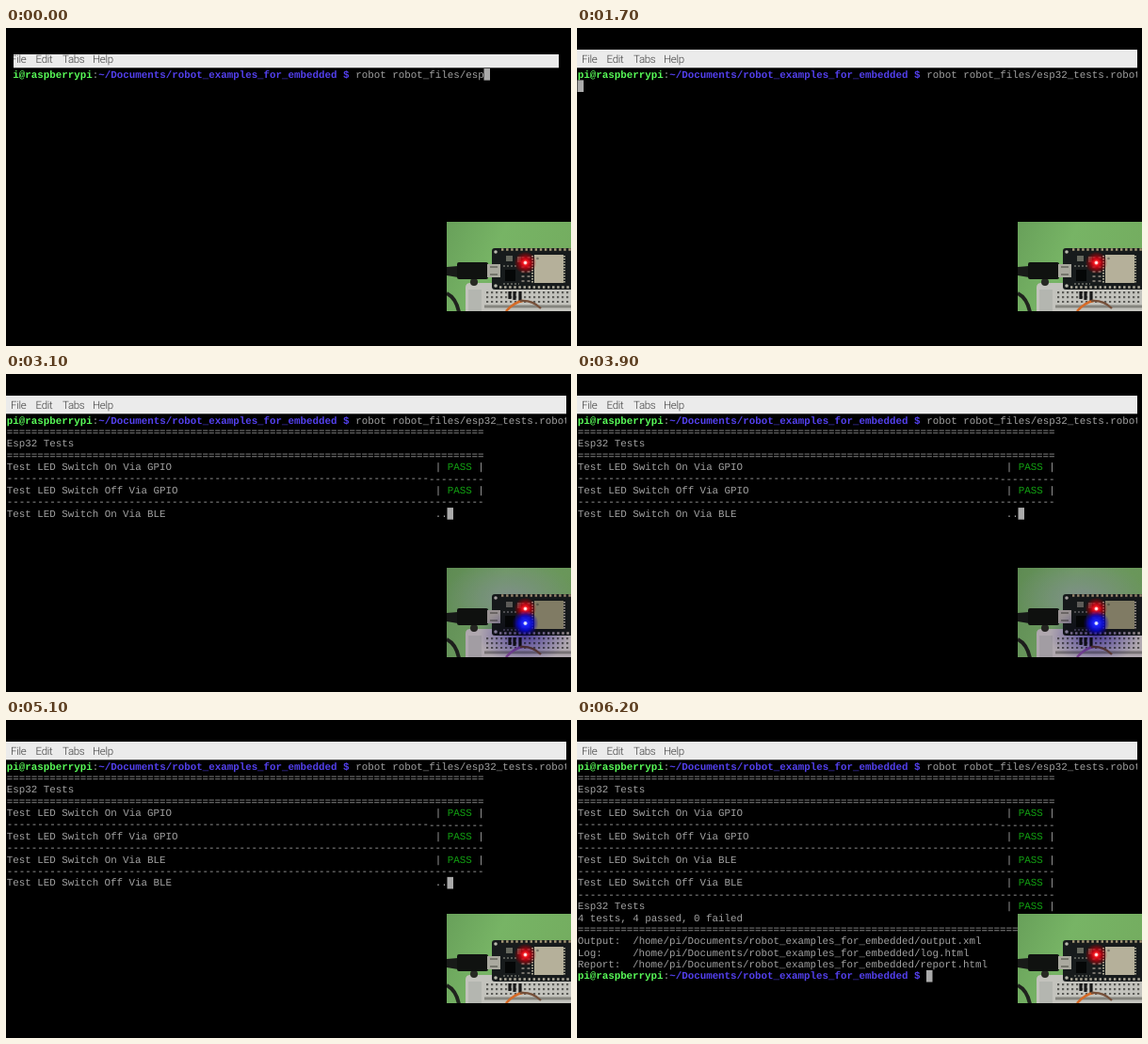
An HTML page that plays this animation: 600x338 px, repeating every 6300 ms.

```html
<!DOCTYPE html>
<html lang="en">
<head>
<meta charset="utf-8">
<title>Robot test run</title>
<style>
html, body { margin: 0; width: 100%; height: 100%; overflow: hidden; background: #000; }
svg { display: block; width: 600px; height: 338px; }
text { white-space: pre; text-rendering: geometricPrecision; }
.term { font: 10.83px "Liberation Mono", monospace; fill: #a2a2a2; }
.menu { font: 300 11.5px Roboto, sans-serif; letter-spacing: -.3px; fill: #3c3c3c; }
.user { font-weight: bold; fill: #58fa58; }
.path { font-weight: bold; fill: #5340ee; }
.pass { fill: #12a212; }
.shade { mix-blend-mode: multiply; }
</style>
</head>
<body>
<svg viewBox="0 0 600 338">
  <defs>
    <clipPath id="wipe"><rect id="pane" height="300"/></clipPath>
    <clipPath id="camClip"><rect x="468" y="206" width="132" height="95"/></clipPath>
    <linearGradient id="desk" x2="1" y2=".3">
      <stop stop-color="#68a05a"/><stop offset=".45" stop-color="#77b465"/><stop offset="1" stop-color="#74ad60"/>
    </linearGradient>
    <radialGradient id="red">
      <stop stop-color="#fff"/><stop offset=".12" stop-color="#ffc0c0"/><stop offset=".2" stop-color="#f81820"/>
      <stop offset=".45" stop-color="#d00010" stop-opacity=".8"/><stop offset="1" stop-color="#a00000" stop-opacity="0"/>
    </radialGradient>
    <radialGradient id="blue">
      <stop stop-color="#fff"/><stop offset=".1" stop-color="#c8d0ff"/><stop offset=".18" stop-color="#2028ff"/>
      <stop offset=".55" stop-color="#0808d8" stop-opacity=".85"/><stop offset="1" stop-color="#1800a0" stop-opacity="0"/>
    </radialGradient>
    <radialGradient id="haze">
      <stop stop-color="#9a9cb4" stop-opacity=".6"/><stop offset="1" stop-color="#9a9cb4" stop-opacity="0"/>
    </radialGradient>
    <radialGradient id="violet">
      <stop stop-color="#7060e0"/><stop offset="1" stop-color="#fff"/>
    </radialGradient>
    <pattern id="holes" x="509" y="279" width="5" height="5" patternUnits="userSpaceOnUse">
      <rect x="1" y="1" width="2.2" height="2.2" fill="#5c5c58"/>
    </pattern>
  </defs>

  <g clip-path="url(#wipe)">
    <rect y="20" width="600" height="22.3" fill="#ebebeb"/>
    <!-- the slight turn frees glyphs from the pixel grid -->
    <g transform="rotate(.01)">
      <g class="menu">
        <text x="5" y="36.8">File</text><text x="31.5" y="36.8">Edit</text>
        <text x="60" y="36.8">Tabs</text><text x="92" y="36.8">Help</text>
      </g>
      <g class="term" id="term"></g>
    </g>
    <rect id="cursor" width="6.5" height="12.6" fill="#aaa"/>
  </g>

  <g clip-path="url(#camClip)">
    <rect x="468" y="206" width="132" height="95" fill="url(#desk)"/>
    <ellipse class="lit" cx="535" cy="238" rx="70" ry="42" fill="url(#haze)"/>
    <path d="M468 282q10 5 13 20" fill="none" stroke="#20221e" stroke-width="4"/>
    <path d="M488 301V276q0-5 5-5h107v30z" fill="#c3c3bd"/>
    <path d="M491 278h14v23h-14z" fill="#b4b6b0"/>
    <rect x="509" y="279" width="91" height="13" fill="url(#holes)"/>
    <path d="M508 296h92" stroke="#85857f" stroke-width="3"/>
    <circle cx="497" cy="270" r="4" fill="#272923"/>
    <path d="M468 254l12-1v12l-12-2z" fill="#181a18"/>
    <rect x="479" y="249" width="33" height="18" rx="2" fill="#101210"/>
    <rect x="516" y="234" width="90" height="44" rx="3" fill="#171b1c"/>
    <g fill="none" stroke-width="2.4" stroke-dasharray="2.4 2.7">
      <path d="M526 235.5h74" stroke="#a99c78"/><path d="M524 275.5h76" stroke="#b4b0a0"/>
    </g>
    <g fill="#b8b9ad"><circle cx="520" cy="238" r="1.8"/><circle cx="520" cy="274" r="1.8"/></g>
    <rect x="511" y="251" width="14" height="14" fill="#aaa99f"/>
    <path d="M514 254h8m-8 8h8" stroke="#64645c" stroke-width="1.5"/>
    <path d="M531 242h7v6h-7zM543 243h4v6h-4z" fill="#66695f"/>
    <rect x="530" y="257" width="11" height="12" fill="#050707"/>
    <path d="M528 253h16m-16 19h17" stroke="#70736b" stroke-width="1.5" stroke-dasharray="2 2"/>
    <path d="M549 243v29m6-29v29" stroke="#77736c" stroke-width="3" stroke-dasharray="2 3"/>
    <path d="M559 242v29m34-29v29" stroke="#a9a794" stroke-width="2" stroke-dasharray="1.5 1.5"/>
    <rect x="561" y="241" width="31" height="30" fill="#b5b09a"/>
    <circle cx="564.5" cy="245" r="1.3" fill="#77776a"/>
    <path d="M535 280v8m5-8v9m6-9v11" stroke="#191919" stroke-width="3.2"/>
    <path id="wire" d="M549 290q-9 1-18 11" fill="none" stroke="#d56a26" stroke-width="2.6"/>
    <path d="M546 290q13-1 22 8" fill="none" stroke="#76503a" stroke-width="2.3"/>
    <g class="lit shade">
      <rect x="468" y="206" width="132" height="95" fill="#e6dcec"/>
    </g>
    <g class="lit shade">
      <ellipse cx="550" cy="278" rx="48" ry="30" fill="url(#violet)"/>
      <rect x="561" y="241" width="31" height="30" fill="#c8cfb4"/>
    </g>
    <circle cx="551.5" cy="249.5" r="12" fill="url(#red)"/>
    <circle class="lit" cx="551.5" cy="265" r="14" fill="url(#blue)"/>
  </g>
</svg>
<script>
const LOOP = 6300, CHAR = 6.5, ROW = 12.385;
const $ = id => document.getElementById(id);
const term = $('term'), parts = [];
const litParts = document.querySelectorAll('.lit');

function print(from, row, col, text, cls = '', to = LOOP) {
  const el = document.createElementNS('http://www.w3.org/2000/svg', 'text');
  el.setAttribute('x', 0.7 + col * CHAR);
  el.setAttribute('y', 52.5 + row * ROW);
  el.setAttribute('class', cls);
  el.textContent = text;
  term.append(el);
  parts.push({ el, from, to });
}

const rule = (at, row, ch) => print(at, row, 0, ch.repeat(78));

function prompt(at, row) {
  print(at, row, 0, 'pi@raspberrypi', 'user');
  print(at, row, 14, ':');
  print(at, row, 15, '~/Documents/robot_examples_for_embedded $', 'path');
}

function passed(at, row) {
  print(at, row, 70, '|      |');
  print(at, row, 72, 'PASS', 'pass');
}

function test(start, end, row, name) {
  print(start, row, 0, 'Test LED Switch ' + name);
  print(start, row, 70, '..', '', end);
  passed(end, row);
  rule(end, row + 1, '-');
}

prompt(0, 0);
print(0, 0, 57, 'robot robot_files/esp');
print(300, 0, 78, '32_tests.robot');
rule(2500, 1, '=');
print(2500, 2, 0, 'Esp32 Tests');
rule(2500, 3, '=');
test(2500, 2600, 4, 'On Via GPIO');
test(2600, 2800, 6, 'Off Via GPIO');
test(2800, 4100, 8, 'On Via BLE');
test(4100, 5400, 10, 'Off Via BLE');
print(5400, 12, 0, 'Esp32 Tests');
passed(5400, 12);
print(5400, 13, 0, '4 tests, 4 passed, 0 failed');
rule(5400, 14, '=');
[['Output:', 'output.xml', 5400], ['Log:', 'log.html', 5600], ['Report:', 'report.html', 5700]]
  .forEach(([label, file, at], i) =>
    print(at, 15 + i, 0, label.padEnd(9) + '/home/pi/Documents/robot_examples_for_embedded/' + file));
prompt(5800, 18);

// time, row, column
const cursorStops = [
  [0, 0, 78], [300, 0, 92], [1500, 1, 0], [2500, 4, 72], [2600, 6, 72], [2800, 8, 72],
  [4100, 10, 72], [5400, 16, 0], [5600, 17, 0], [5700, 18, 0], [5800, 18, 57]
];
const ledSpans = [[2600, 2700], [2800, 4700]];

function draw(now) {
  const t = Math.floor(now % LOOP / 100) * 100;
  const open = Math.min(t, 1400) / 1400;
  const left = Math.round(8 * (1 - open));
  const pane = $('pane');
  pane.setAttribute('x', left);
  pane.setAttribute('y', Math.round(28 - 5 * open));
  pane.setAttribute('width', Math.round(587 + 8.4 * open) - left);

  for (const { el, from, to } of parts)
    el.style.display = t >= from && t < to ? '' : 'none';

  const [, row, col] = cursorStops.findLast(s => t >= s[0]);
  $('cursor').setAttribute('x', 0.5 + col * CHAR);
  $('cursor').setAttribute('y', 43 + row * ROW);

  const lit = ledSpans.some(([a, b]) => t >= a && t < b);
  for (const el of litParts) el.style.display = lit ? '' : 'none';
  $('wire').setAttribute('stroke', lit ? '#9658a0' : '#d56a26');
  requestAnimationFrame(() => draw(performance.now()));
}
draw(performance.now());
</script>
</body>
</html>
```
